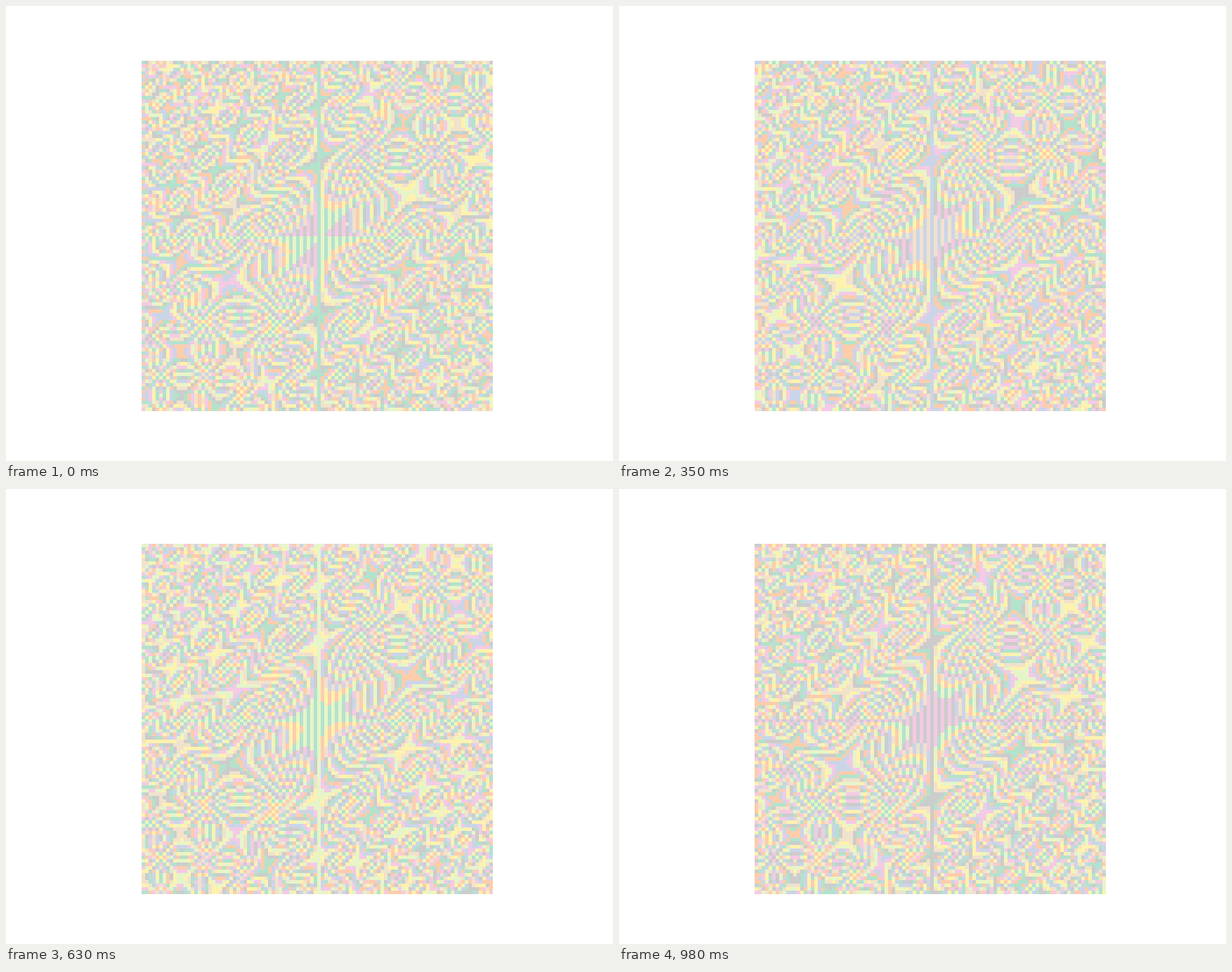
Animation of 864x648 px, one loop 1050 ms. Source, as an HTML page with a canvas:

```html
<!DOCTYPE html>
<html lang="en">
<head>
<meta charset="utf-8">
<title>Cubic moiré</title>
<style>
  html, body { margin: 0; width: 100%; height: 100%; overflow: hidden; background: #fff; }
  canvas { position: absolute; left: 193px; top: 78px; width: 500px; height: 499px; image-rendering: pixelated; }
</style>
</head>
<body>
<canvas id="grid" width="100" height="100"></canvas>
<script>
const SIZE = 100, STEPS = 15, STEP_MS = 70;
const UNIT = 3000; // one full turn of the palette, in whole numbers
const palette = ['b3e2cd', 'fdcdac', 'cbd5e8', 'f4cae4', 'e6f5c9', 'fff2ae', 'f1e2cc', 'cccccc']
  .map(hex => [0, 2, 4].map(i => parseInt(hex.slice(i, i + 2), 16)));

const ctx = document.getElementById('grid').getContext('2d');
const image = ctx.createImageData(SIZE, SIZE);
const mod = (n, m) => ((n % m) + m) % m;

// xy(x + y) + 5x on a 0.1 grid from -5 to 5, taken modulo 1
function phase(col, row) {
  const x = col - SIZE / 2, y = row - SIZE / 2;
  return 3 * (x * y * (x + y) + 500 * x);
}

function draw(step) {
  const shift = step * UNIT / STEPS;
  for (let row = 0, p = 0; row < SIZE; row++) {
    for (let col = 0; col < SIZE; col++, p += 4) {
      const level = mod(phase(col, row) + shift, UNIT);
      image.data.set(palette[Math.floor(level * palette.length / UNIT)], p);
      image.data[p + 3] = 255;
    }
  }
  ctx.putImageData(image, 0, 0);
}

let start, last = 0;
function tick(now) {
  start ??= now;
  const step = Math.floor((now - start) / STEP_MS) % STEPS;
  if (step !== last) draw(last = step);
  requestAnimationFrame(tick);
}
draw(0);
requestAnimationFrame(tick);
</script>
</body>
</html>
```
